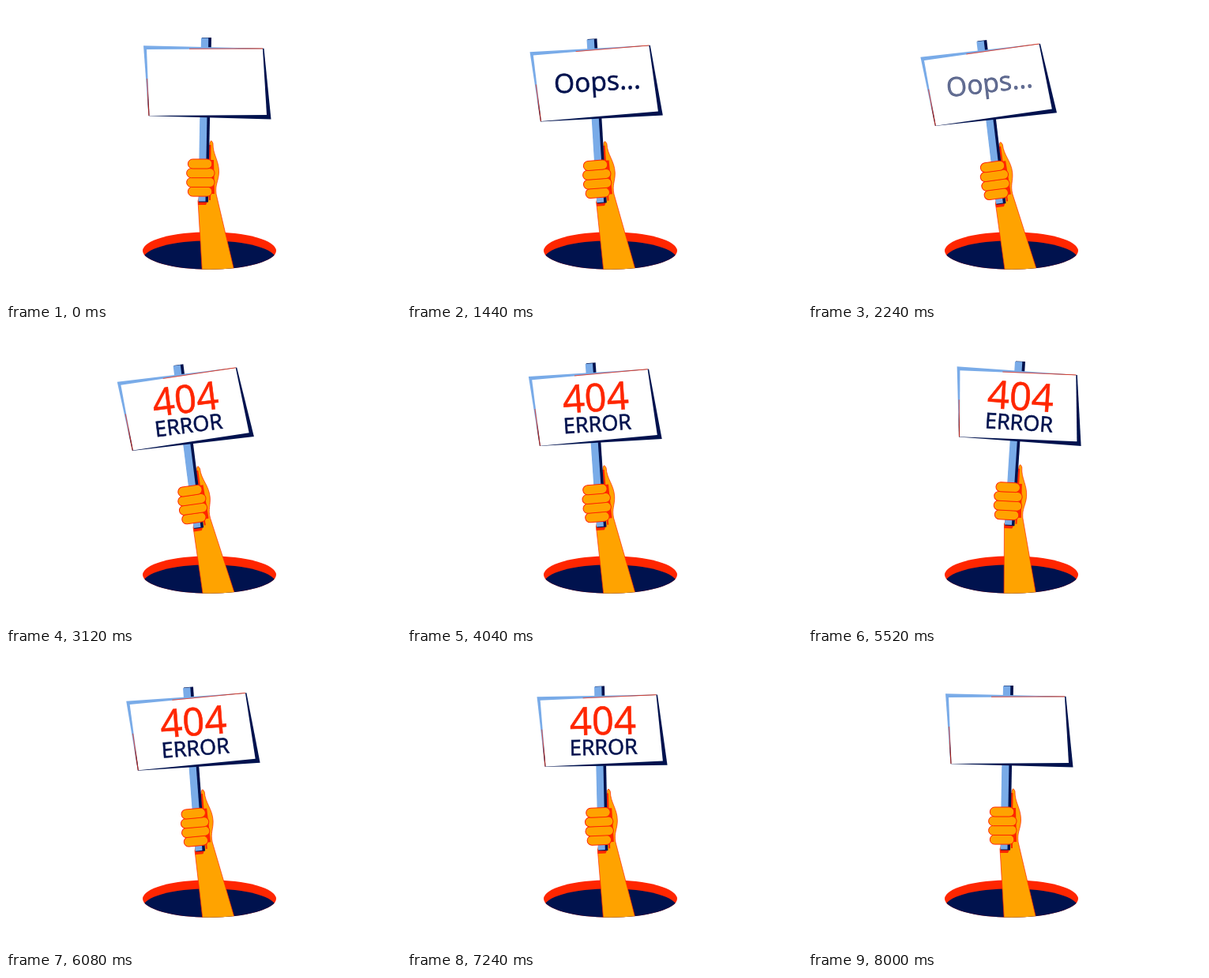
Recreate the animation shown at these times as an HTML page with a canvas. Size 500 px wide and 375 px high, loop 8.12 s.

```html
<!DOCTYPE html>
<html lang="en">
<head>
<meta charset="utf-8">
<title>404 sign</title>
<style>
html, body { margin: 0; width: 100%; height: 100%; overflow: hidden; background: #fff; }
canvas { display: block; }
</style>
</head>
<body>
<canvas id="stage" width="500" height="375"></canvas>
<script>
const ctx = document.getElementById('stage').getContext('2d');
const LOOP = 8120, STEP = 40, LAST = 8000;
const NAVY = '#00124e', RED = '#ff2600', ORANGE = '#ffa300', BLUE = '#79abe8', WHITE = '#fff';
const PIVOT = { x: 265, y: 290 };
const HOLE = { x: 257.5, y: 310, rx: 84.5, ry: 23.8, depth: 11 };
const SWAY = { low: 2800, shake: 4400, calm: 6140, swing: 435 };
const PEAKS = [-4.4, 15, -22, 18, -6.4];

const clamp = v => Math.max(0, Math.min(1, v));
const ease = u => (1 - Math.cos(Math.PI * clamp(u))) / 2;
const glide = (a, b, t, from, to) => a + (b - a) * ease((t - from) / (to - from));

// Slow lean to the left, four quick swings, slow return.
function poseAt(t) {
  const { low, shake, calm, swing } = SWAY;
  let lean, dx = 0;
  if (t < low) lean = glide(0, -8.6, t, 0, low);
  else if (t < shake) lean = glide(-8.6, PEAKS[0], t, low, shake);
  else if (t < calm) {
    const i = Math.floor((t - shake) / swing), from = shake + i * swing;
    lean = glide(PEAKS[i], PEAKS[i + 1], t, from, from + swing);
    dx = 0.45 * (lean + 5);
  } else lean = glide(PEAKS[4], 0, t, calm, LAST);
  return { angle: lean * Math.PI / 180, dx };
}

function outline(color, width) {
  ctx.strokeStyle = color;
  ctx.lineWidth = width;
  ctx.stroke();
}

// Tapered upright strip: left end and width at the top and at the bottom.
function strip(color, x1, y1, w1, x2, y2, w2) {
  ctx.fillStyle = color;
  ctx.beginPath();
  ctx.moveTo(x1, y1);
  ctx.lineTo(x1 + w1, y1);
  ctx.lineTo(x2 + w2, y2);
  ctx.lineTo(x2, y2);
  ctx.fill();
}

function holePath(dy) {
  ctx.ellipse(HOLE.x, HOLE.y + dy, HOLE.rx, HOLE.ry, 0, 0, Math.PI * 2);
}

function drawHole() {
  ctx.save();
  ctx.beginPath();
  holePath(0);
  ctx.fillStyle = RED;
  ctx.fill();
  ctx.clip();
  ctx.beginPath();
  holePath(HOLE.depth);
  ctx.fillStyle = NAVY;
  ctx.fill();
  ctx.restore();
}

// The foot of the arm stays almost put while its upper end follows the hand.
function drawArm(pose) {
  const c = Math.cos(pose.angle), s = Math.sin(pose.angle);
  const at = (x, y) => {
    const u = x - PIVOT.x, v = y - PIVOT.y;
    return [PIVOT.x + pose.dx + u * c - v * s, PIVOT.y + u * s + v * c];
  };
  const foot = 248.5 - 10 * pose.angle;
  ctx.save();
  ctx.beginPath();
  ctx.rect(0, 0, 500, HOLE.y);
  holePath(0);
  ctx.clip();
  ctx.beginPath();
  ctx.moveTo(foot, 340);
  ctx.lineTo(...at(243, 247));
  ctx.lineTo(...at(256, 202));
  ctx.lineTo(...at(258, 174));
  ctx.quadraticCurveTo(...at(259.5, 167.5), ...at(262, 174));
  ctx.bezierCurveTo(...at(261.5, 188), ...at(270, 196), ...at(269.5, 211));
  ctx.bezierCurveTo(...at(269, 222), ...at(264.5, 226), ...at(266, 238));
  ctx.lineTo(foot + 41.5, 340);
  ctx.fillStyle = ORANGE;
  ctx.fill();
  outline(RED, 0.7);
  ctx.restore();
}

function drawPole() {
  strip(RED, 257, 176, 2.5, 257, 246, 2);
  strip(RED, 258, 195, 5, 257, 238, 7);
  strip(RED, 243, 246, 13, 243, 252, 10);
  strip(NAVY, 248, 40, 12, 244, 248.5, 12);
  strip(BLUE, 247, 40.5, 9.3, 243.5, 247.5, 9);
}

function drawFingers() {
  for (let i = 3; i >= 0; i--) {
    const inner = i === 1 || i === 2;
    ctx.beginPath();
    ctx.roundRect(inner ? 228.6 : 230.3, 194 + 11.7 * i, inner ? 35.5 : 30.5, 12, 6);
    ctx.fillStyle = ORANGE;
    ctx.fill();
    outline(RED, 1);
  }
}

function quad(fill, tl, tr, br, bl) {
  ctx.beginPath();
  for (const p of [tl, tr, br, bl]) ctx.lineTo(...p);
  ctx.closePath();
  ctx.fillStyle = fill;
  ctx.fill();
}

// A tilted panel behind the white face leaves the tapered rim visible.
function drawBoard() {
  const rim = ctx.createLinearGradient(215, 60, 255, 140);
  rim.addColorStop(0.3, BLUE);
  rim.addColorStop(0.5, NAVY);
  quad(rim, [174, 50.3], [326.5, 53.8], [335.5, 143.5], [180.5, 139.3]);
  quad(WHITE, [178, 55], [325, 54.2], [330, 138], [181.5, 139]);
  ctx.beginPath();
  ctx.moveTo(232, 54.3);
  ctx.lineTo(325, 53.9);
  ctx.moveTo(178.5, 92);
  ctx.lineTo(181, 139);
  outline(RED, 0.7);
}

function label(text, size, color, y, alpha) {
  ctx.globalAlpha = alpha;
  ctx.font = size + 'px "Open Sans", "Noto Sans", sans-serif';
  ctx.fillStyle = color;
  ctx.fillText(text, 0, y);
  ctx.strokeStyle = color;
  ctx.lineWidth = 0.6;
  ctx.strokeText(text, 0, y);
  ctx.globalAlpha = 1;
}

function drawText(t) {
  const show = (from, to) => Math.min(clamp((t - from) / 200), clamp((to - t) / 200));
  const oops = show(600, 2360), error = show(2360, 7800);
  ctx.save();
  ctx.translate(256, 96);
  ctx.rotate(Math.PI / 180);
  ctx.textAlign = 'center';
  label('Oops...', 33.5, NAVY, 10.2, oops);
  label('404', 49, RED, 5.5, error);
  label('ERROR', 27, NAVY, 31, error);
  ctx.restore();
}

function draw(t) {
  const pose = poseAt(t);
  ctx.fillStyle = WHITE;
  ctx.fillRect(0, 0, 500, 375);
  drawHole();
  drawArm(pose);
  ctx.save();
  ctx.translate(PIVOT.x + pose.dx, PIVOT.y);
  ctx.rotate(pose.angle);
  ctx.translate(-PIVOT.x, -PIVOT.y);
  drawPole();
  drawFingers();
  drawBoard();
  drawText(t);
  ctx.restore();
}

const start = performance.now();
function tick() {
  const t = (performance.now() - start) % LOOP;
  draw(Math.min(LAST, Math.floor(t / STEP) * STEP));
  requestAnimationFrame(tick);
}
tick();
</script>
</body>
</html>
```
